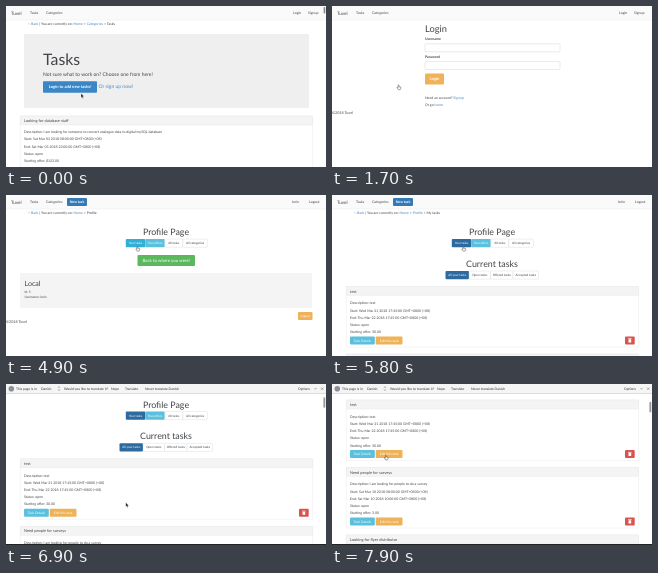
Recreate the animation shown at these times as an HTML page. Size 320 px wide and 161 px high, loop 8 s.

```html
<!DOCTYPE html>
<html lang="en">
<head>
<meta charset="utf-8">
<title>Task board</title>
<style>
  html, body { margin: 0; width: 100%; height: 100%; overflow: hidden; background: #fff; }
  svg { display: block; width: 100%; height: 100%; }
  text { font-family: Lato, "Open Sans", sans-serif; text-rendering: geometricPrecision; white-space: pre; }
</style>
</head>
<body>
<svg id="stage" viewBox="0 0 320 161" xmlns="http://www.w3.org/2000/svg"></svg>
<script>
const LOOP = 8000;
const BRAND = 'Tuvel', USER = 'lorin';
const INK = '#404448', LINK = '#4a87c0', BLUE = '#337ab7', NAVY = '#2d6a9f', SKY = '#5bc0de',
      AMBER = '#f0b259', GREEN = '#5cb85c', RED = '#d9534f', PALE = '#f4f4f4', LINE = '#e5e5e5';

const esc = s => s.replace(/&/g, '&amp;').replace(/</g, '&lt;').replace(/>/g, '&gt;');

// y is the vertical middle of the text
function text(x, y, str, o = {}) {
  const size = o.size || 3.5;
  const body = [].concat(str).map((part, i) =>
    i % 2 ? `<tspan fill="${LINK}">${esc(part)}</tspan>` : esc(part)).join('');
  return `<text x="${x}" y="${y + size * 0.33}" font-size="${size}" fill="${o.fill || INK}"` +
    ` font-weight="${o.weight || 400}" text-anchor="${o.anchor || 'start'}">${body}</text>`;
}

function rect(x, y, w, h, fill, o = {}) {
  return `<rect x="${x}" y="${y}" width="${w}" height="${h}" fill="${fill}" rx="${o.r || 0}"` +
    ` stroke="${o.stroke || 'none'}" stroke-width="${o.sw || 0.4}"${o.id ? ` id="${o.id}"` : ''}/>`;
}

function button(x, y, w, h, fill, label, o = {}) {
  const plain = fill === '#fff';
  return rect(x, y, w, h, fill, { r: 1, stroke: plain ? '#d4d4d4' : 'none', id: o.id }) +
    text(x + w / 2, y + h / 2, label, {
      size: o.size || 3.1, anchor: 'middle', weight: o.weight, fill: plain ? INK : '#fff'
    });
}

// buttons joined in one row: [width, fill, label, id]
function group(x, y, items) {
  return items.map(([w, fill, label, id]) => {
    x += w;
    return button(x - w, y, w, 8.2, fill, label, { id });
  }).join('');
}

function nav(member) {
  const end = member ? [[286, USER], [303, 'Logout']] : [[287, 'Login'], [302, 'Signup']];
  return rect(0, 0, 320, 14, '#fafafa') + rect(0, 13.8, 320, 0.4, '#e4e4e4') +
    text(5, 7, BRAND, { size: 4.6 }) +
    text(24, 7, 'Tasks') + text(40, 7, 'Categories') +
    (member ? button(61, 2.9, 20, 8.2, BLUE, 'New task', { size: 3.5, weight: 700 }) : '') +
    end.map(([x, s]) => text(x, 7, s)).join('');
}

const crumbs = (...trail) => text(22, 18, ['', '< Back', ' | You are currently on: ', ...trail]);
const footer = y => text(0, y, '©2018 ' + BRAND, { size: 3.7 });
const lines = (y, step, list) => list.map((s, i) => text(18, y + i * step, s)).join('');
const heading = (y, s) => text(160, y, s, { size: 8.9, anchor: 'middle' });

function profileTop(active, id) {
  return nav(true) + heading(37.5, 'Profile Page') + group(119.8, 44.1, [
    [19.5, active, 'Your tasks', id], [19.5, SKY, 'Your offers'],
    [18, '#fff', 'All tasks'], [24.5, '#fff', 'All categories']
  ]);
}

function trash(x, y) {
  return rect(x, y, 9.7, 8, RED, { r: 1 }) +
    rect(x + 3.5, y + 2.8, 2.7, 3.2, '#fff', { r: 0.3 }) + rect(x + 3, y + 1.9, 3.7, 0.6, '#fff');
}

function cardHead(y, h, title) {
  return rect(14.3, y, 292.4, h, '#fff', { r: 0.8, stroke: LINE }) +
    rect(14.3, y, 292.4, 9, PALE, { stroke: LINE }) + text(18, y + 4.7, title, { size: 3.95 });
}

function task(y, title, details) {
  return cardHead(y, 60.5, title) + lines(y + 16.7, 7.2, details) +
    button(18, y + 50, 24.8, 8, SKY, 'Task Details', { size: 3.3 }) +
    button(43.7, y + 50, 26.8, 8, AMBER, 'Edit this task', { size: 3.3 }) +
    trash(293, y + 50);
}

const stamp = (label, day, time) => `${label}: ${day} 2018 ${time} GMT+0800 (+08)`;

const home = nav(false) + crumbs('Home', ' > ', 'Categories', ' > Tasks') +
  rect(18, 28, 285, 74, '#efefef', { r: 1 }) +
  text(37, 54, 'Tasks', { size: 15.8 }) +
  text(37, 68.3, 'Not sure what to work on? Choose one from here!', { size: 5 }) +
  button(37, 75.3, 54, 11.5, '#3a87c8', 'Login to add new tasks!', { size: 4.1, weight: 700, id: 'enter' }) +
  text(92.5, 80.3, 'Or sign up now!', { size: 5, fill: LINK }) +
  cardHead(110, 60, 'Looking for database staff') +
  lines(126, 7.2, [
    'Description: I am looking for someone to convert analogue data to digital mySQL database',
    stamp('Start', 'Sat Mar 03', '08:00:00'), stamp('End', 'Sat Mar 03', '23:00:00'),
    'Status: open', 'Starting offer: $123.00'
  ]) + rect(317.6, 1, 1.7, 6.5, '#8a8a8a', { r: 0.8 });

const field = y => rect(93, y, 135, 8, '#fff', { r: 0.8, stroke: '#ccc' });
const fillIn = (y, s) => text(96, y, s, { fill: '#555' }) + rect(221.3, y - 2, 4, 4, '#777', { r: 0.6 });

const login = nav(false) + text(93, 23, 'Login', { size: 9.3 }) +
  text(93, 33, 'Username', { weight: 700 }) + field(37.8) +
  text(93, 51.3, 'Password', { weight: 700 }) + field(55.5) +
  `<g id="filled">${fillIn(41.8, USER)}${fillIn(59.5, '•••••••')}</g>` +
  rect(92.3, 67, 20.4, 12.2, 'none', { r: 1.2, stroke: '#6d8fb5', sw: 1, id: 'ring' }) +
  button(93, 67.6, 19, 11, AMBER, 'Login', { size: 4.1, weight: 700, id: 'go' }) +
  text(93, 91.5, ['Need an account? ', 'Signup']) + text(93, 99, ['Or go ', 'home']) + footer(106.3);

const profile = profileTop(SKY, 'mine') + crumbs('Home', ' > Profile') +
  button(131.5, 60, 57.5, 11, GREEN, 'Back to where you were!', { size: 4.4 }) +
  rect(14, 78, 292, 35, PALE, { r: 0.8 }) +
  text(18.5, 88.7, 'Local', { size: 7.1 }) +
  text(18.5, 97, 'Id: 5', { size: 3.2 }) + text(18.5, 102, 'Username: ' + USER, { size: 3.2 }) +
  button(292, 117, 14.5, 8, AMBER, 'Logout') + footer(127);

const board = profileTop(NAVY) + crumbs('Home', ' > ', 'Profile', ' > My tasks') +
  heading(69, 'Current tasks') + group(113.5, 76, [
    [23.5, NAVY, 'All your tasks'], [21.5, '#fff', 'Open tasks'],
    [22.5, '#fff', 'Offered tasks'], [25.5, '#fff', 'Accepted tasks']
  ]) +
  task(91.5, 'test', [
    'Description: test', stamp('Start', 'Wed Mar 21', '17:45:00'),
    stamp('End', 'Thu Mar 22', '17:45:00'), 'Status: open', 'Starting offer: 30.00'
  ]) +
  task(159, 'Need people for surveys', [
    'Description: I am looking for people to do a survey', stamp('Start', 'Sat Mar 10', '08:00:00'),
    stamp('End', 'Sat Mar 10', '10:00:00'), 'Status: open', 'Starting offer: 3.00'
  ]) +
  task(226.5, 'Looking for flyer distributor', []);

const bar = rect(0, 0, 320, 10.3, '#f5f5f5') + rect(0, 10, 320, 0.5, '#c4c4c4') +
  '<circle cx="5.3" cy="5.2" r="2.8" fill="#8a8f98"/>' +
  [[10, 'This page is in'], [35, 'Danish'], [58, 'Would you like to translate it?'],
   [105, 'Nope'], [119, 'Translate'], [139, 'Never translate Danish'], [292, 'Options']]
    .map(([x, s]) => text(x, 5.4, s, { size: 3.4, fill: '#333' })).join('') +
  '<path d="M52 4.4l1-1.3 1 1.3M52 5.8l1 1.3 1-1.3M308.5 4.6l1 1.2 1-1.2M315 4l2.4 2.4M317.4 4l-2.4 2.4"' +
  ' fill="none" stroke="#666" stroke-width=".5"/>';

const pointer =
  '<path id="arrow" d="M0 0V4.2L1 3.3 1.7 4.9 2.4 4.6 1.7 3.1H3Z" fill="#111" stroke="#fff" stroke-width=".3"/>' +
  '<path id="hand" d="M.4 0Q1-.5 1.2.2V1.7L3.1 2.1V3.4L2.6 4.6H.6L-.8 2.6-.4 2.2.4 2.8Z"' +
  ' fill="#fff" stroke="#222" stroke-width=".4"/>';

const pages = { home, login, profile, board };
document.getElementById('stage').innerHTML = rect(0, 0, 320, 161, '#fff') +
  Object.entries(pages).map(([id, body]) => `<g id="${id}">${body}</g>`).join('') +
  rect(317.4, 0, 1.9, 10.5, '#9a9a9a', { r: 0.9, id: 'thumb' }) +
  `<g id="bar">${bar}</g>` + rect(0, 160, 320, 1, '#222', { id: 'edge' }) +
  `<g id="cursor">${pointer}</g>`;

const $ = id => document.getElementById(id);
const show = (id, on) => $(id).setAttribute('display', on ? 'inline' : 'none');
const move = (id, x, y) => $(id).setAttribute('transform', `translate(${x} ${y})`);
const paint = (id, fill) => $(id).setAttribute('fill', fill);

// eased progress from a to b
function ramp(t, a, b) {
  const p = Math.min(1, Math.max(0, (t - a) / (b - a)));
  return p * p * (3 - 2 * p);
}

// start, end, x, y
const path = [
  [0, 99, 69, 80], [500, 1100, 65.7, 79], [2100, 2600, 102.5, 74],
  [4400, 4900, 130.5, 51.5], [6100, 6400, 119.8, 118.6], [7400, 7900, 53, 71.3]
];

function cursorAt(t) {
  let x = 75, y = 87.5;
  for (const [a, b, nx, ny] of path) {
    const p = ramp(t, a, b);
    x += (nx - x) * p;
    y += (ny - y) * p;
  }
  return [x, y];
}

function draw(time) {
  const t = Math.floor(time % LOOP / 100) * 100;
  const page = t < 1700 ? 'home' : t < 4100 ? 'login' : t < 5800 ? 'profile' : 'board';
  Object.keys(pages).forEach(id => show(id, id === page));

  paint('enter', t >= 700 ? BLUE : '#3a87c8');
  show('filled', t >= 2000);
  paint('go', t >= 2500 ? '#e59a2c' : AMBER);
  show('ring', t >= 3200);
  paint('mine', t >= 4800 ? '#31b0d5' : SKY);

  const drop = 10 * ramp(t, 5900, 6400);
  const scroll = 67.7 * ramp(t, 6600, 7300) + 17.8 * ramp(t, 7400, 7900);
  move('board', 0, drop - scroll);
  move('bar', 0, drop - 10.5);
  show('bar', t >= 6000);
  show('edge', t >= 6000);
  show('thumb', t >= 6400);
  move('thumb', 0, 11 + scroll * 0.08);

  move('cursor', ...cursorAt(t));
  const arrow = t < 100 || (t >= 6200 && t < 7800);
  show('arrow', arrow);
  show('hand', !arrow);
}

const start = performance.now();
function tick() {
  draw(performance.now() - start);
  requestAnimationFrame(tick);
}
tick();
</script>
</body>
</html>
```
